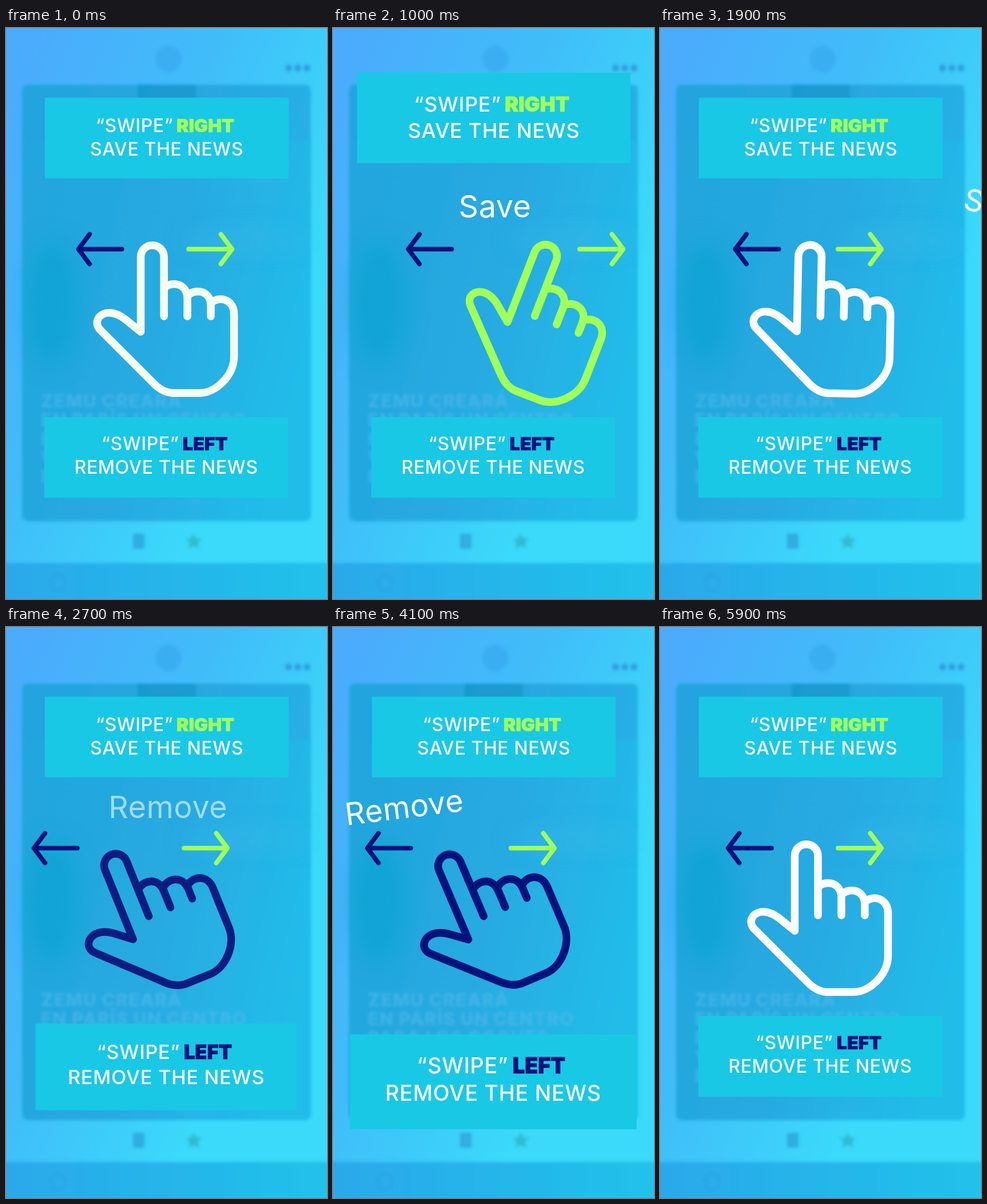
Animation, 561 px wide and 998 px high, one loop 6 s. Source, as an HTML page:

```html
<!DOCTYPE html>
<html lang="en">
<head>
<meta charset="utf-8">
<title>Swipe tutorial</title>
<style>
  html, body { margin: 0; width: 100%; height: 100%; overflow: hidden; }
  svg { display: block; width: 561px; height: 998px; }
  text { font-family: Inter, "Open Sans", sans-serif; }
  .panel rect { fill: #19c8e5; }
  .panel text { font-size: 32px; font-weight: 450; fill: #fff; text-anchor: middle; letter-spacing: .6px; }
  .panel .strong { font-weight: 900; stroke-width: .7; letter-spacing: 0; }
  .word { font-size: 54px; fill: #fff; text-anchor: middle; letter-spacing: .5px; }
  .line { fill: none; stroke-linecap: round; stroke-linejoin: round; }
  .arrow { stroke-width: 8; }
  .headline { font-size: 31px; font-weight: 800; fill: #4fbcf0; opacity: .55; letter-spacing: 1.6px; }
</style>
</head>
<body>
<svg viewBox="0 0 561 998">
  <defs>
    <linearGradient id="sky" gradientUnits="userSpaceOnUse" x1="0" y1="100" x2="561" y2="350">
      <stop stop-color="#4babfd"/><stop offset=".5" stop-color="#40bdf9"/><stop offset="1" stop-color="#3bd9fa"/>
    </linearGradient>
    <linearGradient id="card" gradientUnits="userSpaceOnUse" x1="28" y1="400" x2="533" y2="520">
      <stop stop-color="#20a6dd"/><stop offset=".5" stop-color="#28aae1"/><stop offset="1" stop-color="#22bce9"/>
    </linearGradient>
    <linearGradient id="bar">
      <stop stop-color="#2ba8ea"/><stop offset="1" stop-color="#20c2ea"/>
    </linearGradient>
    <filter id="soft"><feGaussianBlur stdDeviation="2.5"/></filter>
    <filter id="haze" x="-50%" y="-50%" width="200%" height="200%"><feGaussianBlur stdDeviation="20"/></filter>
  </defs>

  <rect width="561" height="998" fill="url(#sky)"/>
  <g filter="url(#soft)">
    <rect x="-10" y="935" width="581" height="80" fill="url(#bar)"/>
    <rect x="28" y="99" width="505" height="763" rx="10" fill="url(#card)"/>
    <rect x="30" y="100" width="501" height="95" fill="#2b9fdc" opacity=".3"/>
    <rect x="230" y="99" width="102" height="26" fill="#1596cb" opacity=".7"/>
    <circle cx="284" cy="54" r="23" fill="#2f9fe6" opacity=".4"/>
    <path class="line" d="M494 70h0M510 70h0M526 70h0" stroke="#2389d2" stroke-width="12" opacity=".65"/>
    <rect x="222" y="884" width="20" height="26" rx="3" fill="#2389c8" opacity=".5"/>
    <path d="M328 883l4 9 10 1-7 7 2 10-9-5-9 5 2-10-7-7 10-1z" fill="#2aa9b4" opacity=".6"/>
    <path class="line" d="M75 967l16-14 16 14M80 966v16h22v-16" stroke="#2a9adb" stroke-width="5" opacity=".3"/>
    <g class="headline">
      <text x="61" y="663">ZEMU CREARÁ</text>
      <text x="61" y="696">EN PARÍS UN CENTRO</text>
      <text x="61" y="729">PARA LOS COCHES</text>
      <text x="61" y="762">VOLADORES DE</text>
      <text x="61" y="795">LA CIUDAD</text>
    </g>
  </g>
  <g filter="url(#haze)">
    <ellipse cx="80" cy="480" rx="45" ry="110" fill="#08a1cd" opacity=".5"/>
    <ellipse cx="420" cy="370" rx="110" ry="14" fill="#48bcec" opacity=".4"/>
  </g>

  <g class="panel" id="top">
    <rect x="-213" y="-70.5" width="426" height="141"/>
    <text x="-56.5" y="-10">“SWIPE”</text>
    <text class="strong" x="67.5" y="-10" style="fill:#a0ff5a;stroke:#a0ff5a">RIGHT</text>
    <text y="31">SAVE THE NEWS</text>
  </g>
  <g class="panel" id="bottom">
    <rect x="-213" y="-70.5" width="426" height="141"/>
    <text x="-45.5" y="-12.5">“SWIPE”</text>
    <text class="strong" x="68" y="-12.5" style="fill:#00137a;stroke:#00137a">LEFT</text>
    <text y="28.5">REMOVE THE NEWS</text>
  </g>

  <text class="word" id="save">Save</text>
  <text class="word" id="remove">Remove</text>

  <path class="line arrow" id="left" stroke="#00137a" d="M195 386.5H119M138.5 360.5L119 386.5L138.5 412.5"/>
  <path class="line arrow" id="right" stroke="#a0ff5a" d="M311 386.5H387M367.5 360.5L387 386.5L367.5 412.5"/>
  <path class="line" id="hand" stroke-width="13.5" d="M235.5 531V400a20.3 20.3 0 0 1 40.6 0V504
    M276 455C289 441 317 446 317 473V504M317 468C331 454 358 459 358 486V504
    M358 481C372 467 398.5 474 398.5 500V575C398.5 606 368 638 338 638H291C276 637 265 629 255 618
    L164 527C152 513 164 496 184 498C193 499 200 503 207 508L235.5 531"/>
</svg>
<script>
const LOOP = 6000, STEP = 100;
const WHITE = [253, 253, 255], GREEN = [160, 255, 90], NAVY = [0, 19, 122];
const $ = id => document.getElementById(id);
const clamp = (v, lo, hi) => Math.min(hi, Math.max(lo, v));
const ramp = (t, from, to) => clamp((t - from) / (to - from), 0, 1);
const ease = u => u * u * (3 - 2 * u);
const blend = (a, b, u) => a.map((v, i) => v + (b[i] - v) * u);

// Eases 0 to 1 between a and b, and back to 0 between c and d.
const pulse = (t, a, b, c, d) => ease(ramp(t, a, b)) - ease(ramp(t, c, d));

function place(id, x, y, angle = 0, scale = 1) {
  $(id).setAttribute("transform", `translate(${x} ${y}) rotate(${angle}) scale(${scale})`);
}

// Grows steadily up to a cap, then snaps back four times as fast.
function panel(id, x, y, drift, t, start, stop) {
  const grow = clamp(Math.min(t - start, 4 * (stop - t)), 0, 1450) / 1000;
  place(id, x, y + drift * grow, 0, 1 + .122 * grow);
}

// Fades in, then tumbles off towards the swiped side.
function word(id, y, side, t, enter, leave) {
  const out = ramp(t, leave, leave + 800) ** 2;
  place(id, 283 + side * 400 * out, y, side * 18 * out);
  $(id).style.opacity = out < 1 ? ramp(t, enter, enter + 350) : 0;
}

function draw(t) {
  const save = pulse(t, 0, 800, 1300, 2000);
  const remove = pulse(t, 2000, 2800, 4150, 4700);
  const drift = 15 * ramp(t, 3300, 4100) * remove;

  panel("top", 281, 192.3, -35.3, t, 0, 1850);
  panel("bottom", 280, 750.5, 30.6, t, 2100, 4600);
  word("save", 331, 1, t, 400, 1200);
  word("remove", 334, -1, t, 2500, 3600);

  place("left", 12.5 * pulse(t, -200, 150, 2000, 2800) - 74 * remove + drift, 0);
  place("right", 120 * pulse(t, -150, 800, 1250, 1800), 0);

  const x = 74.5 * save - 26 * remove + drift;
  const y = 5 * pulse(t, 4600, 5000, 5000, 5800);
  const turn = 21.2 * save - 23 * remove;
  const green = pulse(t, -150, 700, 1300, 1850);
  const hand = $("hand");
  hand.setAttribute("transform", `translate(${x} ${y}) rotate(${turn} 279 509)`);
  hand.setAttribute("stroke", `rgb(${blend(blend(WHITE, GREEN, green), NAVY, remove)})`);
}

const start = performance.now();
function tick() {
  const t = (performance.now() - start) % LOOP;
  draw(Math.floor(t / STEP) * STEP);
  requestAnimationFrame(tick);
}
draw(0);
requestAnimationFrame(tick);
</script>
</body>
</html>
```
